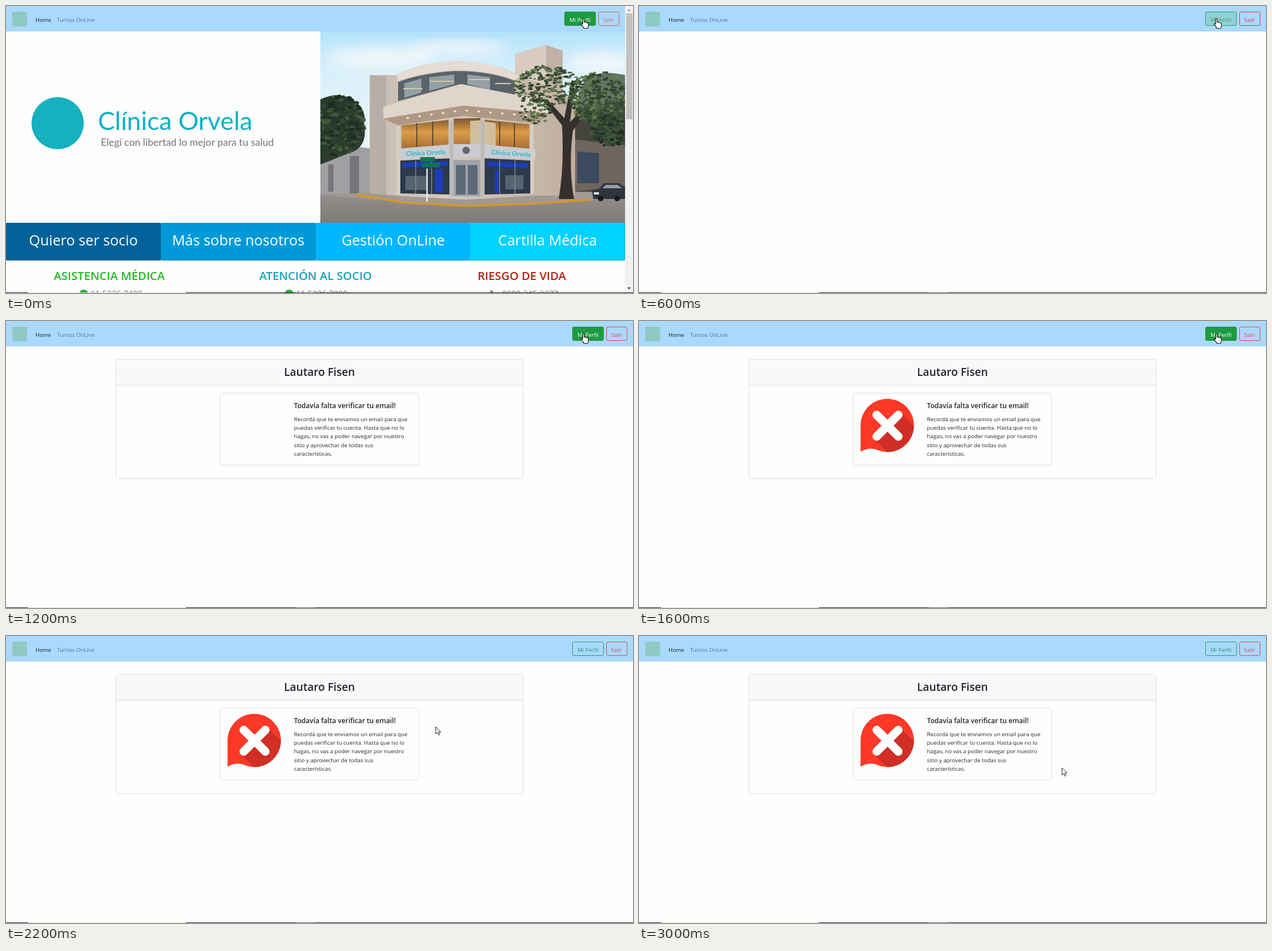
Recreate the animation shown at these times as an HTML page. Size 1105 by 507 pixels, loop 4.2 s.

```html
<!DOCTYPE html>
<html lang="es">
<head>
<meta charset="utf-8">
<title>Perfil</title>
<style>
  html, body { margin: 0; width: 100%; height: 100%; overflow: hidden; background: #fefefe; }
  svg { display: block; width: 100vw; height: 100vh; }
  text { font-family: "Open Sans", "Noto Sans", sans-serif; font-size: 9.7px; }
  .mid { text-anchor: middle; }
  .tab { font-size: 25.3px; fill: #fff; }
  .head { font-size: 20.3px; font-weight: 600; }
  .tel { font-size: 14.6px; fill: #6c757d; }
  .brand { font-family: Lato, sans-serif; font-size: 44.7px; fill: #09b2c5; }
  .motto { font-family: Lato, sans-serif; font-size: 17.7px; fill: #77716d; }
  .sign { font-family: Lato, sans-serif; font-size: 11.3px; font-weight: 700; fill: #25b9cf; }
  .name { font-size: 19.2px; font-weight: 600; fill: #212529; }
  .title { font-size: 12.05px; font-weight: 600; fill: #212529; }
  .body { font-size: 9.75px; fill: #212529; }
</style>
</head>
<body>
<svg viewBox="0 0 1105 507" xmlns="http://www.w3.org/2000/svg">
  <defs>
    <clipPath id="photoClip"><rect x="554" y="45" width="537" height="338"/></clipPath>
    <clipPath id="bubbleClip"><use href="#bubble"/></clipPath>
    <linearGradient id="sky" x1="0" y1="0" x2="0" y2="1">
      <stop offset="0" stop-color="#b3e2fb"/><stop offset=".2" stop-color="#d6effb"/><stop offset=".5" stop-color="#eaf3f7"/>
    </linearGradient>
    <linearGradient id="wall" x1="0" y1="0" x2="1" y2="0">
      <stop offset="0" stop-color="#c6bcb3"/><stop offset=".35" stop-color="#d6cabf"/><stop offset="1" stop-color="#bfae9f"/>
    </linearGradient>
    <linearGradient id="road" x1="0" y1="0" x2="0" y2="1">
      <stop offset="0" stop-color="#94908d"/><stop offset="1" stop-color="#7f7a79"/>
    </linearGradient>
    <linearGradient id="lit" x1="0" y1="0" x2="0" y2="1">
      <stop offset="0" stop-color="#7d5630"/><stop offset=".45" stop-color="#dc9c47"/><stop offset="1" stop-color="#a36d35"/>
    </linearGradient>
    <filter id="soft"><feGaussianBlur stdDeviation="12"/></filter>
  </defs>

  <rect width="1105" height="507" fill="#fefefe"/>
  <rect width="1105" height="45" fill="#aad9fe"/>
  <rect x="11" y="10" width="26" height="26" rx="2" fill="#8fc9c3"/>
  <text x="52" y="27.5" fill="#15202a">Home</text>
  <text x="90" y="27.5" fill="#54708a">Turnos OnLine</text>

  <g id="home">
    <circle cx="91" cy="207" r="46" fill="#16b0bf"/>
    <text class="brand" x="162" y="219">Clínica Orvela</text>
    <text class="motto" x="167" y="247">Elegí con libertad lo mejor para tu salud</text>

    <g clip-path="url(#photoClip)">
      <rect x="554" y="45" width="537" height="338" fill="url(#sky)"/>
      <g filter="url(#soft)" fill="#f2f7f9">
        <ellipse cx="660" cy="92" rx="95" ry="18"/><ellipse cx="800" cy="74" rx="85" ry="12"/>
        <ellipse cx="1050" cy="100" rx="60" ry="18"/>
      </g>
      <!-- surroundings -->
      <path d="M554 258L606 247L645 252V340H554Z" fill="#a09fa2"/>
      <path d="M568 280h9v48h-9zM606 265h16v66h-16z" fill="#74767b"/>
      <path d="M554 165Q585 150 610 165Q636 180 631 208Q637 240 618 254Q580 270 554 280Z" fill="#2b3b2c"/>
      <g id="leftTree"></g>
      <path d="M1000 190L1091 160V335H985Z" fill="#45443d"/>
      <path d="M1003 236L1091 246V318L1003 328Z" fill="#6f655f"/>
      <path d="M1007 257L1045 260V313H1007Z" fill="#3b4a5f"/>
      <path d="M554 333L650 330L1091 328V383H554Z" fill="url(#road)"/>
      <path d="M554 334L655 329H1035L1060 342L810 352L700 346Z" fill="#a09994"/>
      <!-- building -->
      <path d="M897 84L952 69L981 79V190H897Z" fill="#d9cbc1"/>
      <path d="M952 69L981 79V190H952Z" fill="#c0b0a5"/>
      <path d="M641 122L690 122Q715 104 790 97Q858 97 907 124L952 140L1003 168V335H935L810 342L700 336L641 331Z" fill="url(#wall)"/>
      <path d="M641 122L670 125V333L641 331Z" fill="#b9aea5"/>
      <path d="M690 121Q725 103 790 97Q858 97 905 124L897 131Q850 113 790 113Q730 117 690 133Z" fill="#e6dcd3"/>
      <path d="M691 134Q735 118 790 115Q850 114 896 132V161L800 138L691 168Z" fill="#5b636a"/>
      <path d="M702 137L732 128V153L702 162ZM746 126L790 121V138L746 150ZM813 121L853 126V148L813 138Z" fill="#93a0a6"/>
      <path d="M700 146h34M747 133h42M816 130h36M862 137h28" stroke="#d9caa4" stroke-width="2"/>
      <path d="M665 178L803 138L960 169V190L806 176L665 199Z" fill="#e0d5ca"/>
      <path d="M665 199L806 176L960 190L933 207L806 194L691 211Z" fill="#ae9886"/>
      <path d="M706 198L805 184L925 194" stroke="#fff0c9" stroke-width="3" stroke-dasharray="4 17" fill="none"/>
      <path d="M697 211L780 201V247L697 253ZM789 199L836 198V245H789ZM844 201L922 209V253L844 247Z" fill="url(#lit)"/>
      <path d="M818 203L837 202V244H818ZM844 204L863 207V247H844Z" fill="#d0bf9f"/>
      <path d="M724 207v44M752 204v45M870 204v45M896 207v45" stroke="#5f4831" stroke-width="2"/>
      <path d="M690 252L788 244H836L933 253V271L836 267H788L690 272Z" fill="#cbccd1"/>
      <path d="M695 273L783 269V333L695 331ZM843 269L924 273V331L843 333Z" fill="#2b3a4c"/>
      <path d="M699 277L778 274V282L699 285ZM756 288h14v41h-14zM848 275L919 278V286L848 283ZM862 289h6v41h-6z" fill="#1e3cba"/>
      <path d="M704 300h38v25h-38zM880 299h32v25h-32z" fill="#566470"/>
      <path d="M788 272h48v64h-48z" fill="#a0a4a9"/>
      <path d="M793 281h17v52h-17zM814 281h17v52h-17z" fill="#5d6977"/>
      <path d="M722 273v59M750 271v61M870 271v61M897 272v60" stroke="#7c8b97" stroke-width="1.5"/>
      <path d="M785 203V337M840 203V337" stroke="#bebbb7" stroke-width="7"/>
      <path d="M691 211V333M927 210V332" stroke="#d9cec3" stroke-width="6"/>
      <text class="sign" transform="translate(705 265) rotate(-3)">Clínica Orvela</text>
      <text class="sign" transform="translate(855 262) rotate(4)">Clínica Orvela</text>
      <circle cx="811" cy="255" r="6.5" fill="#64666c"/>
      <path d="M616 333L700 347L810 353L930 349L1032 342" fill="none" stroke="#d3982f" stroke-width="4"/>
      <path d="M742 287V346" stroke="#f2f2ed" stroke-width="2.5"/>
      <path d="M730 267h21v8h-21zM745 267h11v7h-11zM733 277h31v8h-31z" fill="#107455"/>
      <!-- street tree and car -->
      <path d="M974 341Q984 285 980 211L947 168L954 165L984 198L997 131L1003 133L994 205L1040 158L1045 162L999 220Q991 285 1001 341Z" fill="#35302d"/>
      <path d="M1020 128Q1050 112 1091 122V244Q1064 250 1040 222Q1012 200 1006 172Z" fill="#3c4d38" opacity=".75"/>
      <g id="rightTree"></g>
      <path d="M1033 326L1045 323L1054 313H1080L1091 321V341H1035Z" fill="#30353d"/>
      <path d="M1051 322L1057 316H1078L1086 322Z" fill="#929ca4"/>
      <path d="M1036 329h9v4h-9z" fill="#dfe3e5"/>
      <circle cx="1048" cy="340" r="5" fill="#17191c"/><circle cx="1077" cy="340" r="5" fill="#17191c"/>
    </g>

    <g id="tabs"></g>
    <text class="head mid" x="182" y="484" fill="#22b922">ASISTENCIA MÉDICA</text>
    <text class="head mid" x="545.5" y="484" fill="#1c9fb8">ATENCIÓN AL SOCIO</text>
    <text class="head mid" x="909" y="484" fill="#b3220f">RIESGO DE VIDA</text>
    <circle cx="137" cy="509" r="8" fill="#2aae35"/>
    <circle cx="499" cy="509" r="8" fill="#2aae35"/>
    <path d="M853 503l4-1 2 5-3 3z" fill="#777d82"/>
    <text class="tel" x="149" y="512.5">11 5236 7400</text>
    <text class="tel" x="511" y="512.5">11 5236 7800</text>
    <text class="tel" x="874" y="512.5">0800 345 2277</text>

    <rect x="1091" width="14" height="507" fill="#f1f1f1"/>
    <rect x="1093" y="13" width="11" height="187" fill="#c1c1c1"/>
    <path d="M1095 9l3-4 3 4z" fill="#a3a3a3"/>
    <path d="M1095 497l3 4 3-4z" fill="#505050"/>
  </g>

  <g id="card">
    <rect x="193.5" y="67.5" width="718" height="211" rx="3" fill="#fefefe" stroke="#dfdfe1"/>
    <path d="M194 114V70q0-2 2-2H909q2 0 2 2V114Z" fill="#f9f9fc"/>
    <path d="M194 113.5H911" stroke="#dcdcde"/>
    <text class="name mid" x="552.5" y="97">Lautaro Fisen</text>
    <rect x="377.5" y="127.5" width="349.5" height="127" rx="3" fill="#fefefe" stroke="#dfdfe1"/>
    <text class="title" x="507.5" y="154">Todavía falta verificar tu email!</text>
    <g id="note"></g>
  </g>

  <g id="icon">
    <path id="bubble" d="M390.5 231V184.5A47 47 0 1 1 437.5 231.5Q428 231 421 228Q406 222 390.5 231Z" fill="#fd3826"/>
    <path d="M462 163L510 211V260H466L414 209L438 185Z" fill="#cf2f25" clip-path="url(#bubbleClip)"/>
    <path d="M419 166L457 204M457 166L419 204" stroke="#fff" stroke-width="15" stroke-linecap="round"/>
  </g>

  <g id="buttons">
    <rect id="profile" x="998.5" y="10.5" width="54.5" height="24" rx="2.5"/>
    <text id="profileText" class="mid" x="1025.7" y="27.5">Mi Perfil</text>
    <rect id="exit" x="1058.5" y="10.5" width="36" height="24" rx="2.5" fill="none"/>
    <text id="exitText" class="mid" x="1076.3" y="27.5">Salir</text>
  </g>

  <path d="M0 506.5H1105" stroke="#1d2230"/>
  <path d="M39 506.5H317" stroke="#e6d9d4"/>
  <path d="M511 506.5H545" stroke="#5d6168"/>

  <path id="hand" fill="#fff" stroke="#111" stroke-width="1.1" stroke-linejoin="round"
    d="M3.5 1.5Q5.5 .3 6 2.5V7.5Q8 6.5 8.7 8Q10.6 7.3 11.2 9Q13.4 8.5 13.4 10.7V14Q13.2 16 12 18.5H5.3Q4.5 16 1.2 12.3Q0 10.7 1.2 10Q2.3 9.8 3.4 11.3Z"/>
  <path id="arrow" fill="#fff" stroke="#222" stroke-width="1" stroke-linejoin="round"
    d="M.5 .5V13L3.4 10.3L5.4 15L7.5 14.1L5.6 9.6H9.3Z"/>
</svg>

<script>
const $ = id => document.getElementById(id);
const NS = 'http://www.w3.org/2000/svg';

function set(el, attrs) {
  for (const k in attrs) el.setAttribute(k, attrs[k]);
}
function add(parent, tag, attrs, text) {
  const el = document.createElementNS(NS, tag);
  set(el, attrs);
  if (text) el.textContent = text;
  parent.appendChild(el);
}

// Foliage: seeded blobs inside an ellipse
let seed = 7;
const rnd = () => (seed = seed * 16807 % 2147483647) / 2147483647;
function leaves(group, cx, cy, rx, ry, count, size, colors) {
  for (let i = 0; i < count; i++) {
    const a = rnd() * Math.PI * 2, d = Math.sqrt(rnd());
    add(group, 'ellipse', {
      cx: cx + Math.cos(a) * d * rx, cy: cy + Math.sin(a) * d * ry,
      rx: size * (.6 + rnd()), ry: size * (.4 + rnd() * .6),
      fill: colors[Math.floor(rnd() * colors.length)]
    });
  }
}
const dark = ['#26382a', '#31452f', '#415a3b', '#1f2c25'];
const light = ['#3a4f35', '#4d6641', '#657d50', '#2e402f'];
leaves($('leftTree'), 590, 212, 42, 54, 260, 3.6, dark);
leaves($('rightTree'), 953, 142, 58, 37, 260, 2.8, light);
leaves($('rightTree'), 1045, 162, 52, 47, 400, 3, light);
leaves($('rightTree'), 1064, 220, 32, 28, 150, 3, dark);
leaves($('rightTree'), 933, 186, 28, 22, 60, 2.6, light);

[['Quiero ser socio', '#006298'], ['Más sobre nosotros', '#0099d8'],
 ['Gestión OnLine', '#00b7ff'], ['Cartilla Médica', '#00d2ff']].forEach(([label, fill], i) => {
  const w = 272.75, x = Math.round(i * w), end = Math.round(x + w);
  add($('tabs'), 'rect', { x, y: 383, width: end - x, height: 66.5, rx: 2, fill });
  add($('tabs'), 'path', { d: `M${x} 449H${end - .5}V383`, fill: 'none', stroke: '#0068a0', 'stroke-opacity': .45 });
  add($('tabs'), 'text', { class: 'tab mid', x: x + w / 2, y: 423 }, label);
});

['Recordá que te enviamos un email para que',
 'puedas verificar tu cuenta. Hasta que no lo',
 'hagas, no vas a poder navegar por nuestro',
 'sitio y aprovechar de todas sus',
 'características.'].forEach((line, i) =>
  add($('note'), 'text', { class: 'body', x: 507.5, y: 176.6 + i * 15.4 }, line));

// Button looks: fill, border, label
const looks = {
  solid: ['#1f9a43', '#1f9040', '#fff'],
  tint: ['#92cfd6', '#2b9b68', '#459f70'],
  rise: ['#2f9f5a', '#23944c', '#f2faf5'],
  fade: ['#57b58d', '#37986b', '#a9dccb'],
  line: ['none', '#27976a', '#2b936e']
};
const exits = { home: '#c9694f', blank: '#dc3545', card: '#de4a4b' };

// Start, page, button look, icon shown, pointer, x, y
const steps = [
  [0, 'home', 'solid', 0, 'hand', 1013, 21],
  [600, 'blank', 'tint', 0, 'hand', 1013, 21],
  [800, 'blank', 'rise', 0, 'hand', 1013, 21],
  [1000, 'blank', 'solid', 0, 'hand', 1013, 21],
  [1200, 'card', 'solid', 0, 'hand', 1013, 21],
  [1400, 'card', 'solid', 1, 'hand', 1013, 21],
  [2000, 'card', 'fade', 1, 'arrow', 912, 41],
  [2200, 'card', 'line', 1, 'arrow', 757, 160],
  [2400, 'card', 'line', 1, 'arrow', 689, 222],
  [2600, 'card', 'line', 1, 'arrow', 671.5, 236.5],
  [2800, 'card', 'line', 1, 'arrow', 745, 232.5]
];
const LOOP = 4200;
const show = (id, on) => $(id).style.display = on ? '' : 'none';

let current;
function draw(t) {
  const step = steps.filter(s => s[0] <= t).pop();
  if (step === current) return;
  current = step;
  const [, page, look, icon, pointer, x, y] = step;
  const [fill, stroke, label] = looks[look];
  show('home', page === 'home');
  show('card', page === 'card');
  show('icon', icon);
  show('hand', pointer === 'hand');
  show('arrow', pointer === 'arrow');
  set($(pointer), { transform: `translate(${x} ${y})` });
  set($('buttons'), { transform: `translate(${page === 'home' ? -14 : 0} 0)` });
  set($('profile'), { fill, stroke });
  set($('profileText'), { fill: label });
  set($('exit'), { stroke: exits[page] });
  set($('exitText'), { fill: exits[page] });
}

const start = performance.now();
function tick() {
  draw((performance.now() - start) % LOOP);
  requestAnimationFrame(tick);
}
tick();
</script>
</body>
</html>
```
